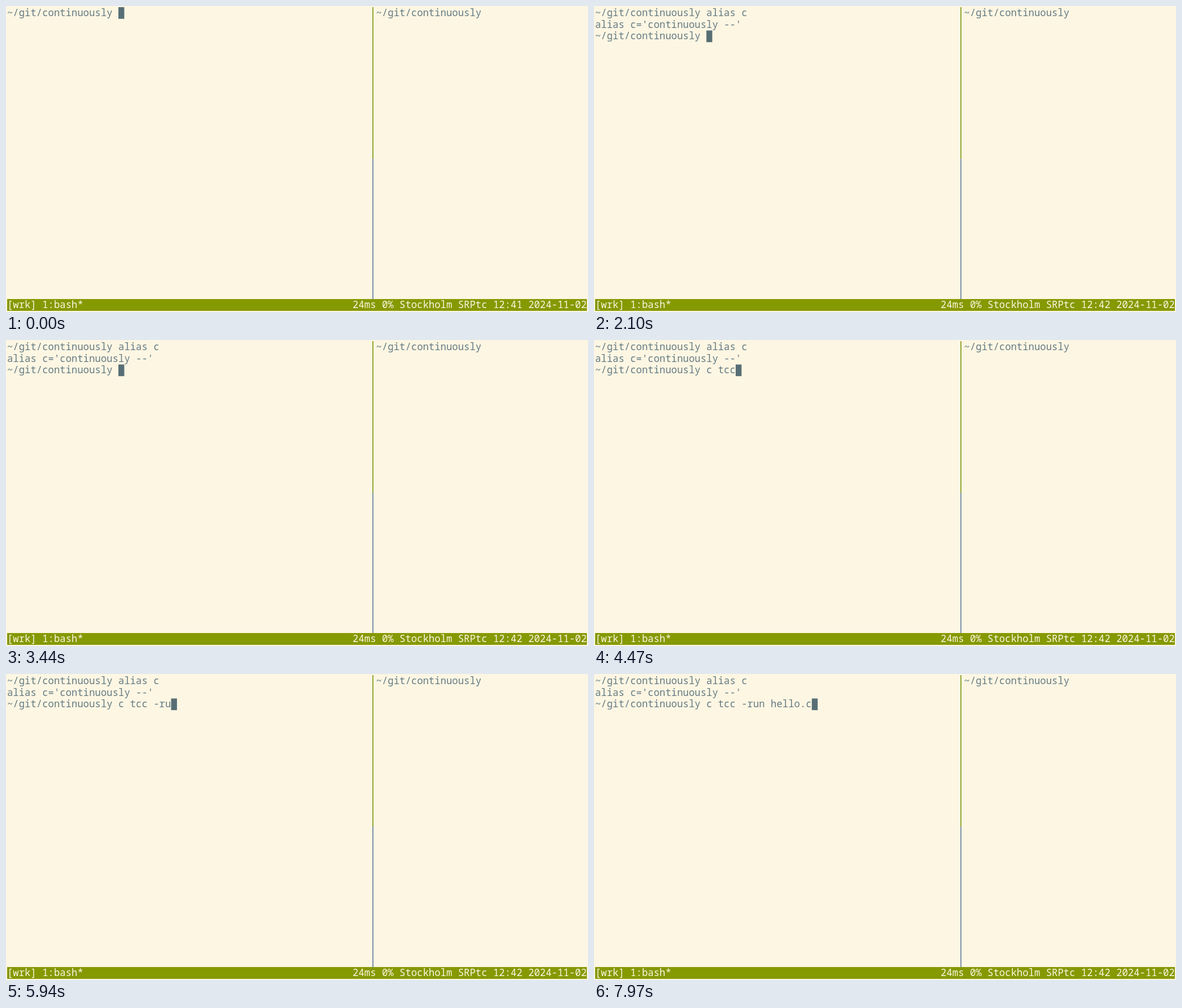
An HTML page that plays this animation: 1031x543 px, repeating every 8000 ms.

```html
<!DOCTYPE html>
<html lang="en">
<head>
<meta charset="utf-8">
<title>Terminal session</title>
<style>
  html, body { margin: 0; width: 100%; height: 100%; overflow: hidden; background: #fdf6e3; }
  svg { display: block; width: 1031px; height: 543px; }
  text { font: 17.29px "Noto Sans Mono", "DejaVu Sans Mono", monospace; fill: #657b83; white-space: pre; font-variant-ligatures: none; }
  .status { fill: #fdf6e3; }
</style>
</head>
<body>
<svg id="stage" viewBox="0 0 1031 543">
  <rect x="649" y="2" width="2" height="269" fill="#94a633"/>
  <rect x="649" y="271" width="2" height="249" fill="#7d91a8"/>
  <rect x="2" y="520" width="1027" height="21" fill="#859900"/>
  <rect id="cursor" width="10.4" height="20.7" fill="#586e75"/>
</svg>
<script>
const LOOP = 8000;
const CELL = 10.374, ROW = 20.73, PAD = 2;
const PROMPT = "~/git/continuously ";
const ENTER = 1800, MINUTE = 1200;

const first = { text: "alias c", keys: [870, 990, 1100, 1200, 1320, 1440, 1560] };
const second = {
  text: "c tcc -run hello.c",
  keys: [3560, 3720, 3960, 4130, 4300, 5050, 5400, 5680, 5860,
         6020, 6200, 6560, 6760, 6950, 7120, 7290, 7500, 7700]
};

const stage = document.getElementById("stage");
const cursor = document.getElementById("cursor");

function addText(col, row, content = "", cls = "") {
  const el = document.createElementNS("http://www.w3.org/2000/svg", "text");
  el.setAttribute("x", PAD + col * CELL);
  el.setAttribute("y", PAD + row * ROW + 16);
  el.setAttribute("class", cls);
  el.textContent = content;
  stage.append(el);
  return el;
}

function setText(el, value) {
  if (el.textContent !== value) el.textContent = value;
}

const typed = (cmd, t) => PROMPT + cmd.text.slice(0, cmd.keys.filter(k => k <= t).length);

const lines = [0, 1, 2].map(row => addText(0, row));
addText(63, 0, PROMPT.trim());
addText(0, 25, "[wrk] 1:bash*", "status");
const info = addText(59, 25, "", "status");

function draw(t) {
  const entered = t >= ENTER;
  const content = [
    typed(first, t),
    entered ? "alias c='continuously --'" : "",
    entered ? typed(second, t) : ""
  ];
  lines.forEach((el, i) => setText(el, content[i]));
  const row = entered ? 2 : 0;
  cursor.setAttribute("x", PAD + content[row].length * CELL);
  cursor.setAttribute("y", PAD + row * ROW);
  setText(info, `24ms 0% Stockholm SRPtc 12:${t < MINUTE ? 41 : 42} 2024-11-02`);
}

const start = performance.now();
function tick() {
  draw((performance.now() - start) % LOOP);
  requestAnimationFrame(tick);
}
tick();
</script>
</body>
</html>
```
